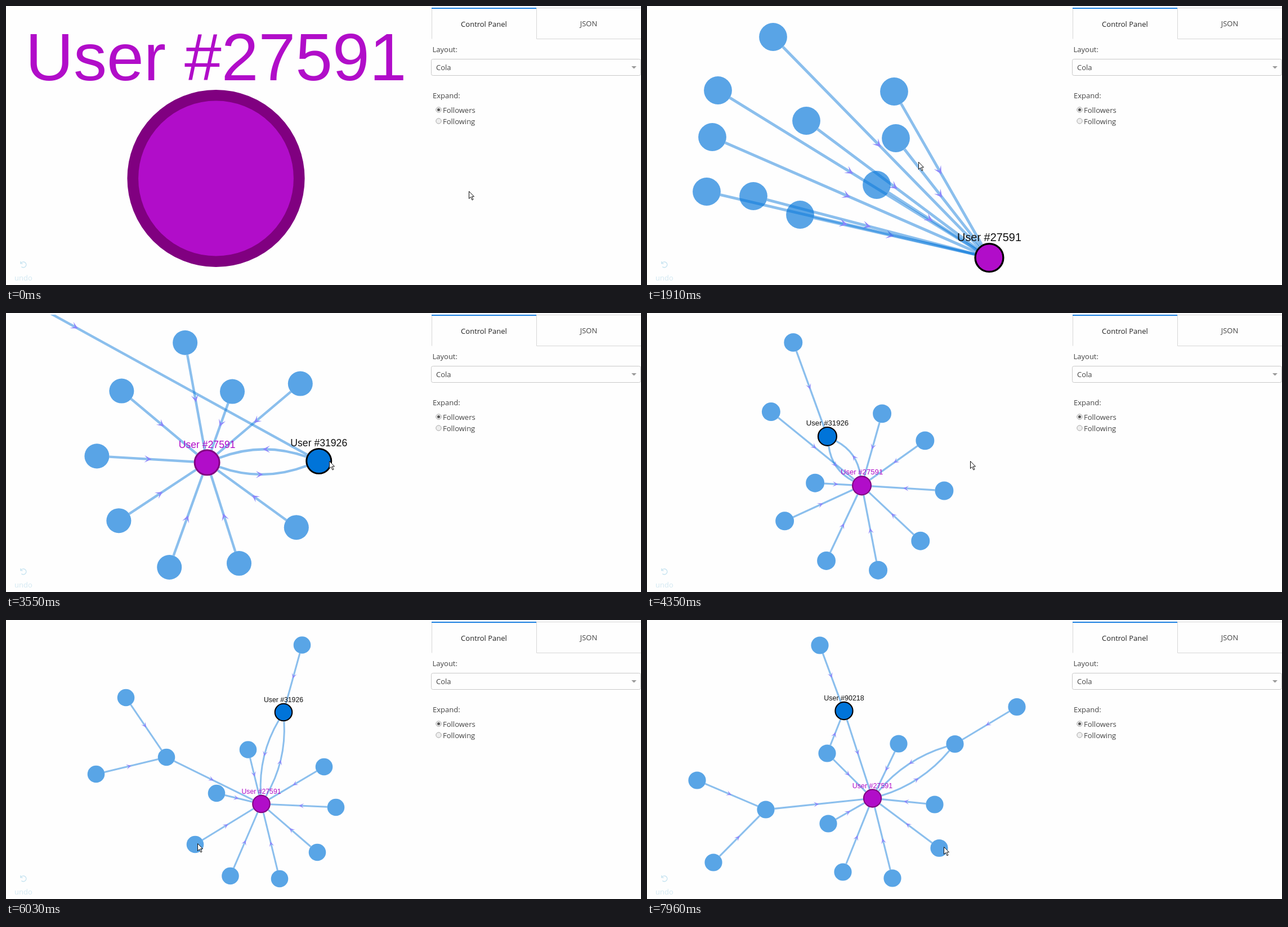
Animation, 1128 px wide and 496 px high, one loop 8 s. Source, as an HTML page with a canvas:

```html
<!DOCTYPE html>
<html lang="en">
<head>
<meta charset="utf-8">
<title>Follower graph</title>
<style>
  html, body { margin: 0; width: 100%; height: 100%; overflow: hidden; background: #fefefe; }
  svg, canvas { position: absolute; left: 0; top: 0; width: 1128px; height: 496px; }
  text { font: 13px "Open Sans", sans-serif; fill: #444; }
</style>
</head>
<body>
<svg viewBox="0 0 1128 496">
  <g fill="none" stroke="#d6d6d6">
    <path d="M756.5 5V58.5M942 3.5H1128M942.5 4V58.5H1128"/>
    <rect x="755.5" y="94.5" width="372" height="29" rx="3" stroke="#c8c8c8"/>
  </g>
  <path d="M756 4H942" stroke="#1a7fe0" stroke-width="2"/>
  <text x="849" y="37" text-anchor="middle" style="fill:#222">Control Panel</text>
  <text x="1035" y="36" text-anchor="middle">JSON</text>
  <text x="757.5" y="82">Layout:</text>
  <text x="764" y="114">Cola</text>
  <path d="M1111 107h9l-4.500 4.500z" fill="#999"/>
  <text x="758" y="164">Expand:</text>
  <g fill="#eee" stroke="#a5a5a5">
    <circle cx="768.5" cy="184.500" r="4.700"/>
    <circle cx="768.5" cy="204.500" r="4.700"/>
  </g>
  <circle cx="768.5" cy="184.500" r="2.500" fill="#555"/>
  <text x="776" y="190">Followers</text>
  <text x="776" y="210">Following</text>
  <path d="M26 454v4h4M26.500 457.500a5 5 0 1 1 1 6" fill="none" stroke="#bfe0ef" stroke-width="1.200"/>
  <text x="15" y="488" style="fill:#d3e8f2">undo</text>
</svg>
<canvas id="stage" width="1128" height="496"></canvas>
<script>
const ctx = document.getElementById('stage').getContext('2d');
const LOOP = 8000, BLUE = '#0074d9', PURPLE = '#b10dc9';
const HUB = 0, FRIEND = 5, LATE = 9;
const labels = { [HUB]: 'User #27591', [FRIEND]: 'User #31926', [LATE]: 'User #90218' };
const born = { 11: 3400, 12: 4890, 13: 4890, 14: 6300 };

const edges = [];
for (let i = 1; i <= 10; i++) edges.push({ from: i, to: HUB, bendAt: i === FRIEND ? 3400 : Infinity });
edges.push({ from: HUB, to: FRIEND, since: 3400, bendAt: 3400 });
for (const [from, to, since] of [[11, 5, 3400], [12, 1, 4890], [13, 1, 4890], [3, 9, 6300], [14, 9, 6300]])
  edges.push({ from, to, since, bendAt: Infinity });

// Node centres, as x, y pairs in node order
const points = (...v) => v.flatMap((x, i) => i % 2 ? [] : [{ x, y: v[i + 1] }]);
const single = points(373, 306.5);
const fan = points(608, 447.5, 126, 150, 224, 55, 283, 204, 439, 152, 442, 235,
  408, 318, 272, 371, 189, 338, 106, 330, 116, 233);
const ring = points(357, 265.5, 205, 138, 318, 52, 402, 139, 523, 125, 556, 263,
  516, 381, 414, 445, 290, 452, 200, 369, 161, 254, -302, -209);
const shrunk = ring.map(p => ({ x: 373 + (p.x - 357) * .72, y: 323 + (p.y - 265) * .72 }));
shrunk[11] = { x: 200, y: 46 };
const pulled = points(456, 304, 286, 166, 503, 180.5, 582, 226, 607, 332, 360, 202,
  558.5, 405, 483, 458, 390.5, 437.5, 315, 365, 383, 300, 343, 53.5, 216, 46, 139, 132);
const beforePull = pulled.map(p => ({ x: p.x - 73, y: p.y }));
const settled = points(453.5, 327, 285, 244, 430, 230.5, 565, 261, 586, 333, 493, 164,
  553, 413, 486, 460, 398.5, 455, 336, 399, 374, 308, 526, 44.5, 213, 138, 160, 274);
const crossed = points(436, 321, 283, 228, 434, 193, 490, 270, 592, 311.5, 532, 164,
  556, 400.5, 488, 459, 388.5, 457.5, 352, 265, 342, 395, 587, 45, 229, 95.5, 154.5, 289, 205, 205);
const final = points(400.5, 317, 211, 337, 447, 220, 320, 237, 511, 328, 547, 220.5,
  519, 405.5, 436, 459, 348, 448, 350, 161.5, 322, 362, 657, 154.5, 89, 285, 118, 431, 307, 45);

const poses = [
  [0, 9.85, single], [1700, 9.85, single], [1701, 1.66, fan], [1920, 1.66, fan],
  [2700, 1.47, ring], [3551, 1.47, ring], [3690, 1.08, shrunk], [4760, 1.1, beforePull],
  [5043, 1.1, pulled], [6030, 1.02, settled], [6160, 1.02, settled],
  [6879, 1.05, crossed], [7960, 1.04, final]
];
const cursorPath = [
  [0, 822, 329], [422, 822, 329], [1110, 482, 277], [2720, 482, 277], [3260, 574, 263],
  [4400, 574, 263], [4900, 554, 259], [5050, 554, 259], [5900, 340, 397],
  [6300, 340, 397], [6879, 349, 397], [7000, 349, 397], [7960, 527, 403]
];

const bursts = [
  [560, 1110, 5], [1660, 2570, 8], [2720, 3690, 8], [3820, 4750, 8],
  [4900, 5900, 8], [6030, 7020, 8], [7150, 7960, 7]
];
function refreshTime(t) {
  const burst = bursts.filter(b => b[0] <= t).pop();
  if (!burst) return 0;
  const [start, end, count] = burst, gap = (end - start) / (count - 1);
  return start + Math.min(count - 1, Math.floor((t - start + 15) / gap)) * gap;
}

const mix = (a, b, p) => a + (b - a) * p;
function between(keys, t) {
  let i = 0;
  while (i < keys.length - 2 && keys[i + 1][0] <= t) i++;
  const a = keys[i], b = keys[i + 1];
  return { a, b, p: Math.max(0, Math.min(1, (t - a[0]) / (b[0] - a[0]))) };
}

function graphAt(t) {
  const { a, b, p } = between(poses, t), e = p * (2 - p);
  const nodes = b[2].map((end, i) => {
    if (t < (born[i] || 0)) return null;
    const start = a[2][i] || end;
    return { x: mix(start.x, end.x, e), y: mix(start.y, end.y, e) };
  });
  return { zoom: mix(a[1], b[1], e), nodes };
}

function selectedAt(t) {
  if (t < 1650) return -1;
  return t < 3250 ? HUB : t < 6160 ? FRIEND : LATE;
}

function toward(a, b, r) {
  const d = Math.hypot(b.x - a.x, b.y - a.y) || 1;
  return { x: a.x + (b.x - a.x) * r / d, y: a.y + (b.y - a.y) * r / d };
}

function drawEdge(a, b, ra, rb, bend, zoom) {
  const dx = b.x - a.x, dy = b.y - a.y, d = Math.hypot(dx, dy) || 1;
  const ctrl = { x: (a.x + b.x) / 2 - dy / d * bend, y: (a.y + b.y) / 2 + dx / d * bend };
  const s = toward(a, bend ? ctrl : b, ra), e = toward(b, bend ? ctrl : a, rb);
  const mid = bend
    ? { x: (s.x + 2 * ctrl.x + e.x) / 4, y: (s.y + 2 * ctrl.y + e.y) / 4 }
    : { x: (s.x + e.x) / 2, y: (s.y + e.y) / 2 };
  ctx.strokeStyle = 'rgba(0,116,217,.45)';
  ctx.lineWidth = 3 * zoom;
  ctx.beginPath();
  ctx.moveTo(s.x, s.y);
  if (bend) ctx.quadraticCurveTo(ctrl.x, ctrl.y, e.x, e.y);
  else ctx.lineTo(e.x, e.y);
  ctx.stroke();

  const u = 4.35 * zoom;
  ctx.save();
  ctx.translate(mid.x, mid.y);
  ctx.rotate(Math.atan2(e.y - s.y, e.x - s.x));
  ctx.fillStyle = '#8c86fb';
  ctx.beginPath();
  ctx.moveTo(0, 0);
  ctx.lineTo(-2 * u, u);
  ctx.lineTo(-u, 0);
  ctx.lineTo(-2 * u, -u);
  ctx.fill();
  ctx.restore();
}

function drawNode(i, p, zoom, selected) {
  const solid = i === HUB || selected;
  ctx.beginPath();
  ctx.arc(p.x, p.y, 15 * zoom, 0, 2 * Math.PI);
  ctx.fillStyle = i === HUB ? PURPLE : BLUE;
  ctx.globalAlpha = solid ? 1 : .65;
  ctx.fill();
  ctx.globalAlpha = 1;
  if (!solid) return;
  ctx.lineWidth = 2 * zoom;
  ctx.strokeStyle = selected ? '#000' : '#800080';
  ctx.stroke();
  ctx.font = `${12 * zoom}px "Liberation Sans", Arial, sans-serif`;
  ctx.textAlign = 'center';
  ctx.fillStyle = selected ? '#111' : PURPLE;
  ctx.fillText(labels[i], p.x, p.y - 17.75 * zoom);
}

function drawCursor(t) {
  const { a, b, p } = between(cursorPath, t);
  ctx.save();
  ctx.translate(mix(a[1], b[1], p) + .5, mix(a[2], b[2], p) + .5);
  ctx.beginPath();
  for (const [x, y] of [[0, 0], [0, 13], [3, 10], [5.5, 15.5], [7.5, 14.5], [5, 9.3], [9, 9.3]]) ctx.lineTo(x, y);
  ctx.closePath();
  ctx.fillStyle = '#fff';
  ctx.strokeStyle = '#111';
  ctx.lineWidth = 1;
  ctx.fill();
  ctx.stroke();
  ctx.restore();
}

function draw() {
  const t = refreshTime(performance.now() % LOOP);
  const { zoom, nodes } = graphAt(t), selected = selectedAt(t);
  const radius = i => (i === HUB || i === selected ? 16 : 15) * zoom;
  ctx.clearRect(0, 0, 1128, 496);
  ctx.save();
  ctx.beginPath();
  ctx.rect(0, 3, 745, 493);
  ctx.clip();
  for (const { from, to, since = 0, bendAt } of edges) {
    if (t < since || !nodes[from] || !nodes[to]) continue;
    drawEdge(nodes[from], nodes[to], radius(from), radius(to), t >= bendAt ? 25 * zoom : 0, zoom);
  }
  nodes.forEach((p, i) => p && i !== HUB && drawNode(i, p, zoom, i === selected));
  drawNode(HUB, nodes[HUB], zoom, selected === HUB);
  ctx.restore();
  drawCursor(t);
  requestAnimationFrame(draw);
}
draw();
</script>
</body>
</html>
```
